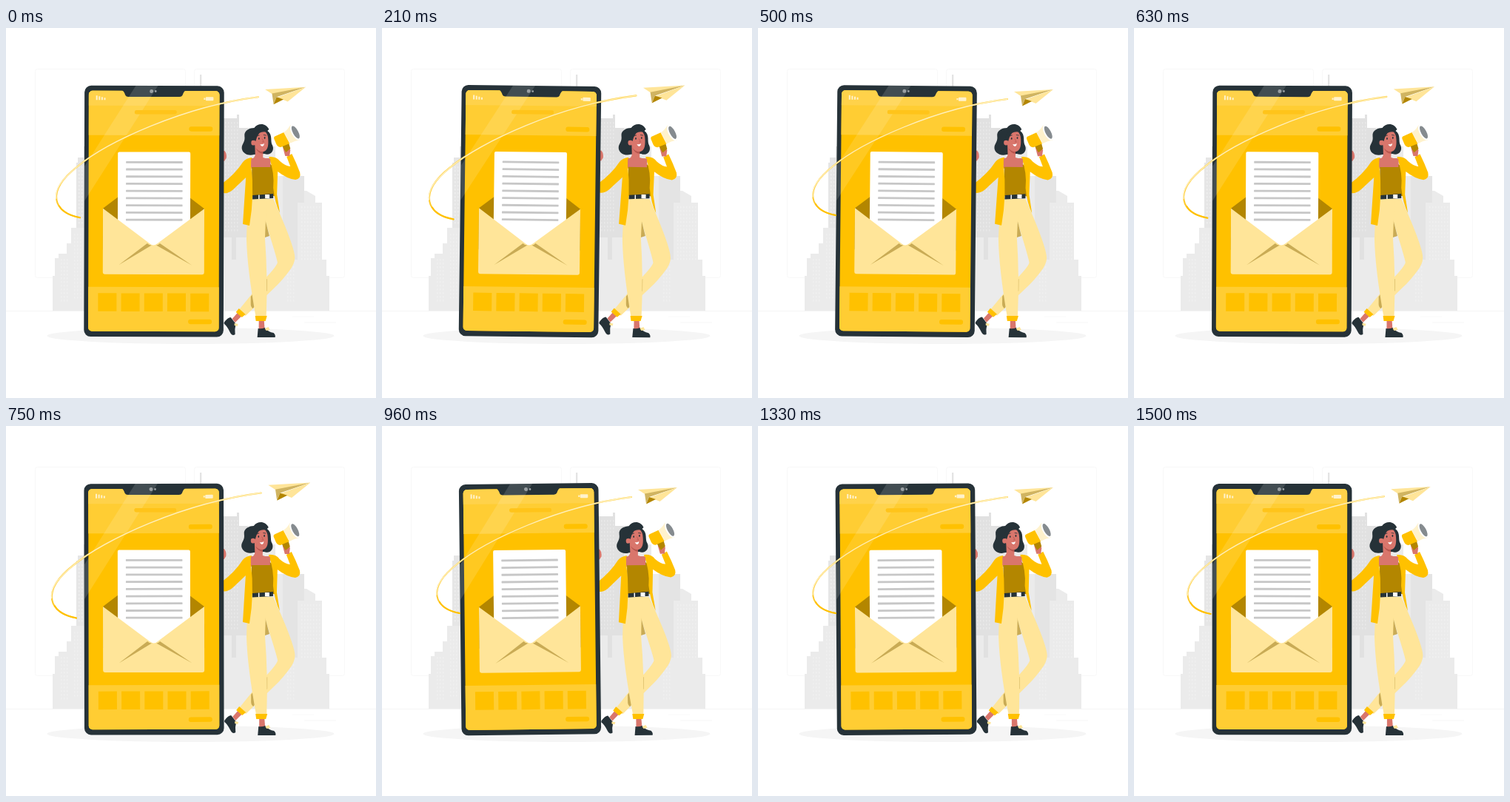
An HTML page with a canvas for the animation above (1.54 s loop, 500 px wide and 500 px high).

```html
<!DOCTYPE html>
<html lang="en">
<head>
<meta charset="utf-8">
<title>Newsletter</title>
<style>
html, body { margin: 0; width: 100%; height: 100%; overflow: hidden; background: #fff; }
canvas { display: block; }
</style>
</head>
<body>
<canvas id="stage" width="500" height="500"></canvas>
<script>
const ctx = document.getElementById('stage').getContext('2d');
const LOOP = 1540, STEPS = 37, LEAD = 58;
const YELLOW = '#ffc100', PALE = '#ffe599', GOLD = '#b38600', TAN = '#c9ab55';
const DARK = '#263238', SKIN = '#d9766c';

function shape(color, d) {
  ctx.fillStyle = color;
  ctx.fill(new Path2D(d));
}

function line(color, width, d) {
  ctx.strokeStyle = color;
  ctx.lineWidth = width;
  ctx.lineCap = 'round';
  ctx.stroke(new Path2D(d));
}

function box(color, x, y, w, h, r = 0) {
  ctx.fillStyle = color;
  ctx.beginPath();
  ctx.roundRect(x, y, w, h, r);
  ctx.fill();
}

function oval(color, x, y, rx, ry, turn = 0) {
  ctx.fillStyle = color;
  ctx.beginPath();
  ctx.ellipse(x, y, rx, ry, turn, 0, Math.PI * 2);
  ctx.fill();
}

// Linear interpolation through [position, value] stops
function track(p, stops) {
  const i = stops.findIndex(([at]) => at >= p);
  if (i <= 0) return stops[0][1];
  const [a, from] = stops[i - 1], [b, to] = stops[i];
  return from + (to - from) * (p - a) / (b - a);
}

function around(x, y, change, draw) {
  ctx.save();
  ctx.translate(x, y);
  change();
  ctx.translate(-x, -y);
  draw();
  ctx.restore();
}

function drawWindows(color, x, y, w, h) {
  for (let wy = y; wy < y + h; wy += 5)
    for (let wx = x; wx < x + w; wx += 4) box(color, wx, wy, 1.5, 2.5);
}

function drawBackdrop() {
  ctx.fillStyle = '#fff';
  ctx.fillRect(0, 0, 500, 500);
  ctx.strokeStyle = '#f8f8f8';
  ctx.lineWidth = 1;
  for (const x of [39.5, 254.5]) {
    ctx.beginPath();
    ctx.roundRect(x, 55.5, 203, 282, 3);
    ctx.stroke();
  }
  box('#f4f4f4', 0, 382, 500, 1);
  box('#f8f8f8', 387, 389.5, 29, 1);
  box('#f8f8f8', 403, 397.5, 43, 1);

  box('#e4e4e4', 262, 63, 2.3, 60);
  shape('#e6e6e6', 'M95 382V182H97V175H105V160H120V382Z');
  shape('#ebebeb', 'M63 382V335H66V311H71V305H82V291H88V270H120V382Z');
  shape('#ebebeb', 'M290 382V122H312V117H315V135H350V160H364V200H403V220H406L418 227V236H427V313H433V335H437V382Z');
  shape('#e1e1e1', 'M290 122H312V117H315V135H327V283H311V313H305V283H290Z');
  shape('#e4e4e4', 'M374 200H403V236H394V313H374Z');
  drawWindows('#e9e9e9', 296, 127, 18, 150);
  drawWindows('#f0f0f0', 74, 312, 12, 60);
  drawWindows('#f0f0f0', 92, 278, 12, 90);
  drawWindows('#eeeeee', 98, 187, 6, 78);
  drawWindows('#f0f0f0', 399, 241, 25, 74);
  drawWindows('#f0f0f0', 380, 322, 12, 50);
  oval('#f5f5f5', 249.5, 416, 194, 11);
}

function drawLegs() {
  shape(SKIN, 'M313 385L306 393L310 398L319 389Z');
  shape(PALE, 'M349 231H361L370 251Q387 290 390 306Q392 314 386 324Q374 341 363 351L324 389L315 381L345 344Q365 324 367 317Q366 310 350 260Z');
  shape(TAN, 'M350 258Q353 270 356 281L350 283ZM353 339V355L334 379Q331 377 331 373V363L344 346Z');
  shape(YELLOW, 'M315 379L324 387L319 391L311 384Z');
  shape(DARK, 'M295 398Q300 391 304 391L311 400Q309 407 310 414Q306 417 303 411Q299 403 295 400Z');
  shape(PALE, 'M309 399L314 400L313 403L309 402Z');

  shape(SKIN, 'M342 394H349L350 408H342Z');
  shape(PALE, 'M333 230H352Q351 255 350 285Q354 335 352 391H338Q326 325 325 285Q325 253 333 230Z');
  shape(YELLOW, 'M337 389L353 389L351 396H338Z');
  shape(DARK, 'M341 406Q346 407 350 405Q355 411 362 412Q365 415 364 418H340Z');
  shape(PALE, 'M350 406L355 404L357 408L352 409Z');
}

function drawMegaphone() {
  shape(SKIN, 'M374 162Q378 157 382 160L384 165L383 173L377 173Z');
  shape(GOLD, 'M372 158L382 156L384 163L378 168Z');
  shape(YELLOW, 'M362 150Q361 147 364 146L375 141L383 156L371 161Q367 161 365 157Z');
  shape('#fff2cc', 'M375 141Q380 138 384 131L397 151Q390 152 383 156Z');
  oval('#fff', 390.5, 141, 5, 11.5, -0.5);
  oval('#858b8f', 391, 140.8, 3.6, 9.5, -0.5);
}

function drawHead() {
  shape(DARK, 'M353 139C361 145 356 153 360 159C363 167 356 173 349 170L335 171C326 174 317 168 318.5 160C320 155 323 153 322 146C321 138 330 135 335 135C340 128 351 128 355 137Z');
  shape(SKIN, 'M336 157L347 164V175Q352 177 357 177V188H331V177Q336 176 336.5 171Z');
  shape('#b95750', 'M337 162Q341 167 347 167V170Q340 169 337 162Z');
  shape(SKIN, 'M335 149Q339 140 349 139Q354 143 354 151Q355 165 348 167Q340 168 336 158Q331 160 331 155Q331 151 335 152Z');
  shape(DARK, 'M333 150Q334 138 348 136L354 141Q346 139 342 142Q338 147 337 153Z');
  oval(DARK, 341.5, 149.5, 0.9, 1.4);
  oval(DARK, 349.3, 148.5, 0.9, 1.4);
  line(DARK, 0.8, 'M339 146L342 145M348 144.5L351 145');
  line('#b95750', 0.8, 'M346 150L348 154H346');
  shape('#fff', 'M343 157Q346 158 348.5 156Q348.5 159.5 346 160Q344 159.5 343 157Z');
}

function drawWoman() {
  drawLegs();
  shape(SKIN, 'M288 167L295 166Q298.5 170 297.5 176L295 180H288Z');
  shape(SKIN, 'M331 176H357V190H331Z');
  shape(GOLD, 'M332 184Q345 186 357 184L364 190V227H332Z');
  shape(DARK, 'M333 226L361 224V230L333 231.5Z');
  shape('#fff', 'M341 225.5H342.5V231H341ZM350 225H356V230.3H350Z');

  shape(YELLOW, 'M332 175Q324 176 320 181Q310 197 290 212V222Q297 226 306 219L324 202L320 265L329 267Q336 225 331 186Z');
  shape(YELLOW, 'M355 174Q365 173 370 180Q378 187 384 187L379 174L386 170Q392 182 397 195Q399 203 391 205Q380 204 367 194L366 225L370 250Q363 236 361 216Q363 196 355 174Z');
  drawHead();
  drawMegaphone();
}

function drawEnvelope() {
  shape(GOLD, 'M131 244L199.5 192L268 244V300H131Z');
  box('#fff', 151, 167.5, 98, 132, 2);
  for (let i = 0; i < 9; i++) box('#c7c7c7', 162, 180 + i * 9.72, 76.5, 2.8, 0.5);
  shape(PALE, 'M131 244L194 291Q199.5 296 205 291L268 244V330Q268 333 265 333H134Q131 333 131 330Z');
  shape(TAN, 'M152.5 320.5L191 291Q194 294 197 293.5ZM251.5 320.5L208 291Q205 294 203 293.5Z');
}

function drawPhone() {
  box(DARK, 105.7, 78, 188.6, 339.3, 9);
  box(YELLOW, 111.5, 85, 176.5, 325, 5);
  box('#ffcd33', 111.5, 85, 176.5, 60, [5, 5, 0, 0]);
  box('#ffd24a', 111.5, 85, 176.5, 20, [5, 5, 0, 0]);
  box('#ffcd33', 111.5, 350, 176.5, 60, [0, 0, 5, 5]);
  shape(DARK, 'M156 84H243Q240 85 238 91Q237 93 234 93H165Q162 93 161 91Q159 85 156 84Z');

  shape('rgba(255,255,255,.13)', 'M175 78H205L106 234V187Z');
  oval('#9aa0a3', 196.3, 85.4, 2.5, 2.5);
  oval('#9aa0a3', 201.8, 85.5, 1.4, 1.4);
  [6, 5, 4, 3].forEach((h, i) => box('#fff2cc', 121.3 + i * 3.6, 97.5 - h, 2, h));
  box('#fff2cc', 269.5, 93, 10.5, 5, 1);
  box('#fff2cc', 267, 94.3, 2, 2.4);

  box('#ffc41a', 173.5, 111, 57, 5.5, 2.5);
  box('#ffc100', 247, 133, 32, 6.5, 3);
  box('#ffc100', 246.5, 393.5, 32, 6.5, 3);
  for (let i = 0; i < 5; i++) box(YELLOW, 124.7 + i * 31.2, 358.5, 25, 24.5);
  drawEnvelope();
}

function drawPlane() {
  line('#ffcb2e', 2, 'M337 96C240 108 139 155 101 187C59 220 71 247 105 253');
  line('#fff0bd', 1.3, 'M337 96C240 108 139 155 101 187C79 205 72.5 217 74 228');
  line(YELLOW, 1.9, 'M78 238C83 247 94 251 105 253');
  shape(PALE, 'M346 86L399 83L356 92.5Z');
  shape('#d0b461', 'M399 83L355 91.5L357 105L361 96Z');
  shape(PALE, 'M399 83L362 96.5L375.5 102Z');
  shape(GOLD, 'M357 105.5L361 96L370 99Z');
}

function render(time) {
  const step = Math.floor((time % LOOP + 2) / LOOP * STEPS);
  const phase = (step / STEPS + LEAD / LOOP) % 1;
  const sway = track(phase, [[0, 0], [0.25, 1], [0.75, -1], [1, 0]]);
  const beat = track(phase, [[0, 1], [0.1, 1.1], [0.3, 1], [0.4, 1], [0.5, 1.1], [0.6, 1], [1, 1]]);
  const tilt = () => ctx.rotate(sway * Math.PI / 180);

  drawBackdrop();
  around(346, 273, tilt, drawWoman);
  around(200, 247.5, tilt, drawPhone);
  around(236.3, 168, () => ctx.scale(beat, beat), drawPlane);
}

const start = performance.now();
function tick() {
  render(performance.now() - start);
  requestAnimationFrame(tick);
}
tick();
</script>
</body>
</html>
```
